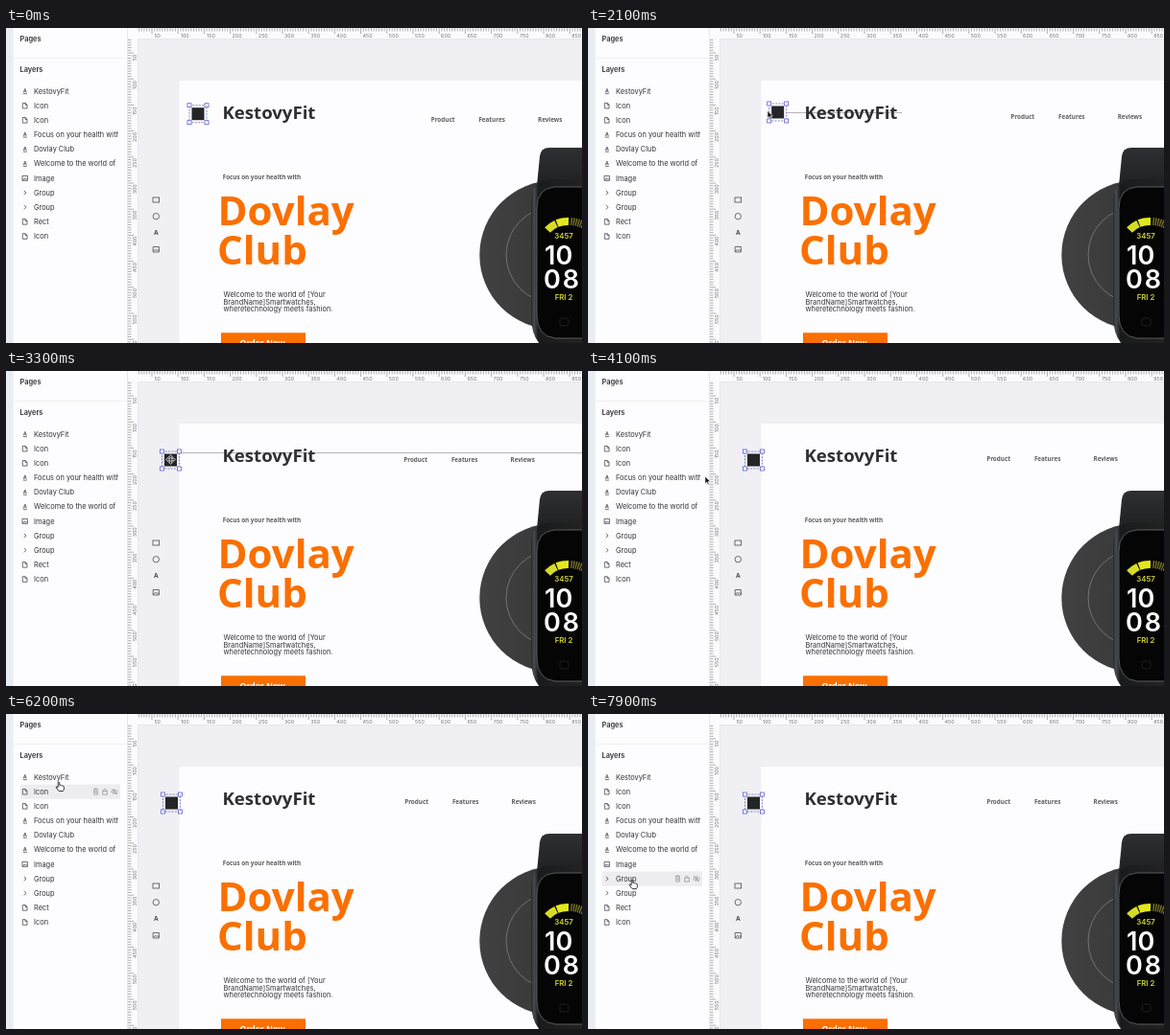
Write an HTML page that moves like this. It is 600x329 px and loops after 8 s.

```html
<!DOCTYPE html>
<html lang="en">
<head>
<meta charset="utf-8">
<title>Page editor</title>
<style>
html, body { margin: 0; width: 100%; height: 100%; overflow: hidden; background: #f0eff3; }
svg { display: block; width: 600px; height: 329px; }
.ui { font: 7.4px Inter, sans-serif; fill: #333337; }
.head { font: 600 7.4px Inter, sans-serif; fill: #333337; }
.site { font: 700 6.3px "Noto Sans", sans-serif; fill: #5c5c61; }
.brand { font: 700 18.6px "Noto Sans", sans-serif; fill: #2f3034; }
.title { font: 700 42px "Noto Sans", sans-serif; fill: #fa7000; }
.button { font: 700 8.7px "Noto Sans", sans-serif; fill: #fff; }
.rule { font: 5.4px Inter, sans-serif; fill: #77777c; text-anchor: middle; }
.digits { font: 600 27px Inter, sans-serif; fill: #fff; }
.watch { font: 600 7.8px Inter, sans-serif; fill: #d3d832; text-anchor: middle; }
.line { fill: none; stroke: #4b4b50; stroke-width: .8; }
.tool { fill: none; stroke: #99999e; stroke-width: .8; }
</style>
</head>
<body>
<svg id="stage" viewBox="0 0 600 329">
  <defs>
    <clipPath id="names"><rect x="14" y="55" width="103" height="175"/></clipPath>
    <linearGradient id="disc">
      <stop offset="0" stop-color="#414142"/><stop offset=".35" stop-color="#3b3b3c"/>
      <stop offset="1" stop-color="#202021"/>
    </linearGradient>
    <linearGradient id="case">
      <stop offset="0" stop-color="#26272a"/><stop offset=".06" stop-color="#4a4c4f"/>
      <stop offset=".14" stop-color="#1a1b1d"/><stop offset="1" stop-color="#222"/>
    </linearGradient>
    <linearGradient id="strap" x2="0" y2="1">
      <stop offset="0" stop-color="#2e2f32"/><stop offset="1" stop-color="#1c1d1f"/>
    </linearGradient>
  </defs>

  <rect width="600" height="329" fill="#f0eff3"/>
  <rect x="180.5" y="55" width="420" height="274" fill="#fdfcff"/>
  <path id="guide" stroke="#a3a3a8" stroke-width=".8"/>

  <!-- page content -->
  <text class="brand" x="225.5" y="95.3">KestovyFit</text>
  <g id="nav" class="site">
    <text x="442.7" y="98">Product</text>
    <text x="492.4" y="98">Features</text>
    <text x="554" y="98">Reviews</text>
  </g>
  <text class="site" x="225.7" y="158">Focus on your health with</text>
  <text class="title" x="220.5" y="206">Dovlay</text>
  <text class="title" x="220" y="247">Club</text>
  <g class="ui">
    <text x="226.5" y="281">Welcome to the world of [Your</text>
    <text x="226.5" y="288.6">BrandName]Smartwatches,</text>
    <text x="226.5" y="296.2">wheretechnology meets fashion.</text>
  </g>
  <rect x="224" y="318.3" width="88" height="20" fill="#fa7000"/>
  <text class="button" x="243.5" y="332">Order Now</text>

  <!-- watch -->
  <circle cx="571" cy="237" r="77.7" fill="url(#disc)"/>
  <circle cx="571" cy="237" r="50" fill="none" stroke="#808082" stroke-width=".8"/>
  <path d="M600 125H566Q557 125 556 134L552 175H600Z" fill="url(#strap)"/>
  <path d="M600 158H566Q547 160 547 181V300Q547 320 556 330H600Z" fill="url(#case)"/>
  <path d="M600 166H572Q553 167 553 188V300Q553 322 572 324H600" fill="#050506" stroke="#6b6d70" stroke-width=".8"/>
  <g fill="none" stroke-width="8">
    <path d="M564 211A32 32 0 0 1 573 204.5" stroke="#d6dc26"/>
    <path d="M574 204A32 32 0 0 1 586 202" stroke="#e3e81c"/>
    <path d="M588.5 202A32 32 0 0 1 602 206" stroke="#77722a" stroke-dasharray="1.4 1"/>
  </g>
  <text class="watch" x="581" y="219.5">3457</text>
  <text class="digits" x="561" y="246.5">10</text>
  <text class="digits" x="560" y="271.5" letter-spacing="2">08</text>
  <text class="watch" x="581" y="283.5">FRI 2</text>
  <rect x="577" y="303" width="9" height="8" rx="2" fill="none" stroke="#1f1f21"/>

  <!-- side panel and rulers -->
  <rect width="126" height="329" fill="#fdfcff"/>
  <rect width="7.5" height="329" fill="#eaecf3"/>
  <path d="M8 31.3H126" stroke="#efeff3"/>
  <text class="head" x="14.5" y="14">Pages</text>
  <text class="head" x="14.5" y="45.5">Layers</text>
  <rect id="hover" x="15" width="104" height="15" fill="#ededef"/>
  <g id="rows" class="ui" clip-path="url(#names)"></g>
  <g id="tools">
    <rect x="90" y="-7.5" width="29" height="15" fill="#ededef"/>
    <path class="tool" d="M91 -2.5H96M91.7 -2.5V3H95.3V-2.5M93 -1V1.5M94.2 -1V1.5M92.7 -3.5H94.3M100.6 -.7H105.4V3H100.6ZM101.6 -.7V-2Q103 -4.2 104.4 -2V-.7M109.5 0Q113 -4.5 116.5 0Q113 4.5 109.5 0ZM110 -3L116 3"/>
    <circle class="tool" cx="113" r="1.1"/>
  </g>
  <path d="M126 0H600V11H137V329H126Z" fill="#fbfafd"/>
  <path d="M126.5 0V329M137.5 329V11.5H600" fill="none" stroke="#e7e6eb"/>
  <path id="ticks" stroke="#8e8e93" stroke-width=".7"/>
  <g id="marks" class="rule"></g>

  <!-- shape toolbar -->
  <g class="line">
    <rect x="153" y="177" width="6.6" height="5"/>
    <circle cx="156.3" cy="196.7" r="3.2"/>
    <path d="M153.2 228.5H159.4V234H153.2ZM153.5 233.5L155.5 231.3L157 232.5L158 231.5L159.3 233"/>
  </g>
  <text class="head" x="154" y="215.6" style="font-size:6.5px">A</text>

  <g id="icon">
    <rect x="-6.5" y="-6.5" width="13" height="13" fill="#242529"/>
    <rect x="-9" y="-9" width="18" height="18" fill="none" stroke="#5a5db8" stroke-width=".7" stroke-dasharray="2 1.3"/>
    <g id="handles" fill="#fff" stroke="#5b5fcf" stroke-width=".8"></g>
  </g>

  <g id="move" fill="#222" stroke="#fff" stroke-width=".7">
    <path d="M0 -5L2 -2.6H.7V-.7H2.6V-2L5 0L2.6 2V.7H.7V2.6H2L0 5L-2 2.6H-.7V.7H-2.6V2L-5 0L-2.6 -2V-.7H-.7V-2.6H-2Z"/>
  </g>
  <path id="arrow" d="M0 0V7.6L1.8 6L3 8.8L4.3 8.2L3.1 5.5H5.5Z" fill="#111" stroke="#fff" stroke-width=".6"/>
  <path id="hand" d="M-.8 .6Q0 -.6 .8 .6V3.6Q1.8 2.7 2.5 3.8Q3.6 3.1 4.1 4.3Q5.4 4 5.4 5.4V7.2Q5.3 8.6 4.4 9.6H.2L-2.7 6Q-3 4.6 -1.9 4.9L-.8 5.8Z" fill="#fff" stroke="#222" stroke-width=".9"/>
</svg>
<script>
const LOOP = 8000, ROW = 15.15, FIRST = 66;
const $ = id => document.getElementById(id);

const glyphs = {
  text: 'M18.3 1.3L19.8 -2.6L21.3 1.3M18.8 .2H20.8M17.8 2.6H21.8',
  page: 'M17.3 -2.8H20.2L22 -1V2.8H17.3ZM20 -2.8V-.9H22',
  image: 'M17 -2.5H22.4V2.5H17ZM17.3 2.1L19 .2L20.3 1.3L21.1 .5L22.2 1.7',
  group: 'M18.8 -2.2L21 0L18.8 2.2'
};
const layers = [
  ['text', 'KestovyFit'], ['page', 'Icon'], ['page', 'Icon'],
  ['text', 'Focus on your health with'], ['text', 'Dovlay Club'],
  ['text', 'Welcome to the world of'], ['image', 'Image'],
  ['group', 'Group'], ['group', 'Group'], ['page', 'Rect'], ['page', 'Icon']
];
$('rows').innerHTML = layers.map(([kind, name], i) =>
  `<g transform="translate(0 ${FIRST + i * ROW})"><path class="line" d="${glyphs[kind]}"/>
   <text x="29" y="2.7">${name}</text></g>`).join('');

$('handles').innerHTML = [[-9, -9], [9, -9], [-9, 9], [9, 9]].map(([x, y]) =>
  `<rect x="${x - 2}" y="${y - 2}" width="4" height="4"/>`).join('');

// Rulers: a longer tick and a label every 50 units, nine short ticks between
const UNIT = 27.2;
let ticks = '', marks = '';
for (let i = -9; i < 180; i++) {
  const x = 152 + i * UNIT / 10, y = 26 + i * UNIT / 10, long = i % 10 === 0;
  const size = long ? 6 : 3.5;
  if (x > 137) ticks += `M${x} 0V${size}`;
  if (y > 11 && y < 329) ticks += `M127 ${y}h${size}`;
  if (!long) continue;
  const value = 50 + i * 5, shift = value < 100 ? 5 : 6.3;
  marks += `<text x="${x + shift + .7}" y="10">${value}</text>`;
  if (y < 329) marks += `<text transform="translate(136 ${y + shift}) rotate(-90)">${value}</text>`;
}
$('ticks').setAttribute('d', ticks);
$('marks').innerHTML = marks;

// Each key: time, x, y
const iconPath = [[0, 200, 89.7], [1700, 200, 89.7], [2100, 197.7, 88], [2500, 184, 80],
  [2900, 173, 83], [3300, 171.5, 93], [3600, 172.5, 93]];
const navPath = [[0, 0, 0], [1700, 0, 0], [2100, -2.3, -3], [2500, -16, -3.2],
  [2900, -27, -3.2], [3300, -28.5, -3.3], [3600, -27.5, -4]];
const pointerPath = [[1000, 200, 89.7], [1700, 200, 89.7], [2100, 187, 86.5], [2500, 178, 80],
  [2900, 172, 83], [3300, 171.5, 92.5], [3650, 172, 92], [4100, 122, 110], [4500, 95, 128],
  [5100, 83, 143], [5200, 82, 169], [5450, 79, 186], [5700, 70, 166], [6100, 57, 85],
  [6200, 55, 71], [6400, 53, 66], [6700, 52, 66], [7200, 49, 96], [7700, 46, 168], [7900, 46, 173]];

function along(keys, t) {
  const next = keys.findIndex(k => k[0] > t);
  if (next < 0) return keys[keys.length - 1].slice(1);
  if (next === 0) return keys[0].slice(1);
  const a = keys[next - 1], b = keys[next], p = (t - a[0]) / (b[0] - a[0]);
  return [a[1] + (b[1] - a[1]) * p, a[2] + (b[2] - a[2]) * p];
}
const place = (id, [x, y]) => $(id).setAttribute('transform', `translate(${x} ${y})`);
const show = (id, on) => $(id).style.display = on ? '' : 'none';

function pointerKind(t, x) {
  if (t < 1000) return '';
  if (t < 1900 || (t >= 2700 && t < 3600)) return 'move';
  return x < 119 ? 'hand' : 'arrow';
}

function draw(t) {
  const icon = along(iconPath, t), pointer = along(pointerPath, t);
  place('icon', icon);
  place('nav', along(navPath, t));

  const kind = pointerKind(t, pointer[0]);
  for (const id of ['move', 'arrow', 'hand']) {
    show(id, id === kind);
    place(id, pointer);
  }

  const toBrand = t >= 1950 && t < 2250, toEdge = t >= 3150 && t < 3600;
  show('guide', toBrand || toEdge);
  $('guide').setAttribute('d', toBrand ? `M${icon[0] + 9} 88.5H327` : 'M181 85.5H600');

  // The highlight trails the pointer slightly
  const [hx, hy] = along(pointerPath, t - 100);
  const row = Math.round((hy - FIRST) / ROW), hovered = t > 3700 && hx < 119;
  show('hover', hovered);
  show('tools', hovered);
  place('hover', [0, FIRST + row * ROW - 7.5]);
  place('tools', [0, FIRST + row * ROW]);
}

const start = performance.now();
function tick() {
  draw((performance.now() - start) % LOOP);
  requestAnimationFrame(tick);
}
tick();
</script>
</body>
</html>
```
